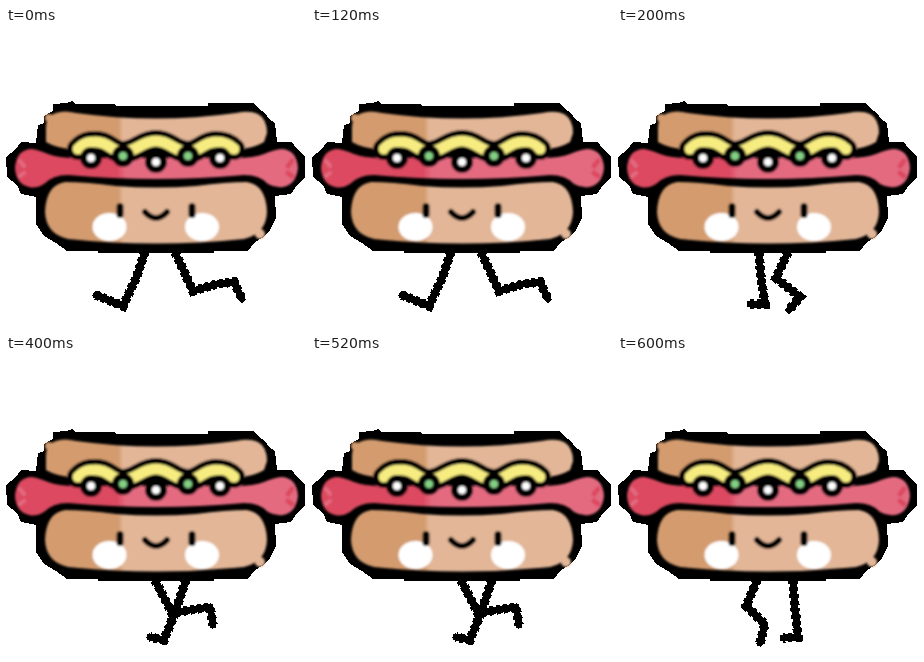
An HTML page for the animation above (0.8 s loop, 300 by 300 pixels).

```html
<!DOCTYPE html>
<html lang="en">
<head>
<meta charset="utf-8">
<title>Running hot dog</title>
<style>
html, body { margin: 0; height: 100%; overflow: hidden; background: #fff; }
svg { display: block; width: 100vw; height: 100vh; }
.line { fill: none; stroke: #000; stroke-linecap: round; stroke-linejoin: round; }
.rough { fill: none; stroke: #000; stroke-dasharray: 4 3; }
</style>
</head>
<body>
<svg viewBox="0 0 300 300">
  <defs>
    <linearGradient id="bun" gradientUnits="userSpaceOnUse" x1="0" x2="300" y1="0" y2="0">
      <stop offset=".375" stop-color="#d39b6e"/>
      <stop offset=".39" stop-color="#e2b697"/>
    </linearGradient>
    <linearGradient id="meat" gradientUnits="userSpaceOnUse" x1="0" x2="300" y1="0" y2="0">
      <stop offset=".37" stop-color="#dc4a61"/>
      <stop offset=".4" stop-color="#e46b80"/>
    </linearGradient>
    <filter id="soft"><feGaussianBlur stdDeviation=".9"/></filter>
    <path id="mustard" d="M72 121C79 114 84 114 90 114C103 114 106 124 117 124C130 124 136 113 150 113C164 113 169 124 182 124C193 124 197 114 210 114C216 114 222 115 228 121"/>
  </defs>
  <g shape-rendering="crispEdges">
    <path class="leg line" stroke-width="7"/>
    <path class="leg rough" stroke-width="9.5"/>
    <!-- silhouette -->
    <path d="M66 73L69 76H108L110 78H202V75H248L252 80L260 86L263 91L269 95L271 114H286L290 120L299 128V149L291 157L285 166L269 168L270 190L264 202L258 209L249 214L242 223H208V225H92V223H61L50 215L38 208L30 196V169L15 166L11 157L1 149L0 129L10 121L15 114L30 115L32 97L38 95V88L47 83V76L60 75Z"/>
  </g>

  <g filter="url(#soft)">
    <!-- top bun -->
    <path fill="url(#bun)" d="M40 114V103Q39 88 50 85Q58 82 70 85Q150 96 230 85Q244 82 252 86Q261 91 261 105L258 114Q248 120 234 121H66Q50 120 40 114Z"/>
    <circle cx="43" cy="90" r="4" fill="#d39b6e"/>

    <!-- sausage -->
    <path fill="url(#meat)" d="M9 140Q10 123 24 121Q30 121 42 126Q52 130 70 130H230Q248 130 258 126Q270 121 277 121Q291 123 292 140Q290 157 277 159Q269 160 262 156Q254 147 238 147Q150 155 62 147Q47 147 38 156Q30 161 23 159Q10 156 9 140Z"/>
    <path fill="none" stroke="#e46b80" stroke-width="4" stroke-linecap="round" d="M14 133L18 138M18 145L14 148"/>
    <path fill="none" stroke="#dc4a61" stroke-width="5" stroke-linecap="round" d="M286 133L282 138M282 145L286 148"/>

    <!-- bottom bun -->
    <path fill="url(#bun)" d="M39 184Q40 157 59 154Q80 154 110 158Q150 161 190 158Q220 154 241 154Q260 157 261 184Q260 206 238 211Q150 220 62 211Q40 206 39 184Z"/>
    <circle cx="254" cy="206" r="5" fill="#e2b697"/>

    <!-- mustard -->
    <use href="#mustard" class="line" stroke-width="22"/>
    <use href="#mustard" class="line" stroke-width="11" style="stroke:#f6ec80"/>
    <g id="dots"></g>

    <!-- face -->
    <g fill="#fff">
      <ellipse cx="103.5" cy="199" rx="17" ry="14"/>
      <ellipse cx="196" cy="199" rx="17" ry="14"/>
    </g>
    <rect x="110.5" y="175" width="7" height="15" rx="3.5"/>
    <rect x="182.5" y="175" width="7" height="15" rx="3.5"/>
    <path class="line" stroke-width="6" d="M139 184Q150 196 161 184"/>
  </g>
</svg>
<script>
const dots = [[85, 130], [117, 128], [150, 134], [182, 128], [214, 130]];
document.getElementById('dots').innerHTML = dots.map(([x, y], i) =>
  `<circle cx="${x}" cy="${y}" r="11"/>
   <circle cx="${x}" cy="${y}" r="4" fill="${i % 2 ? '#83cf83' : '#fff'}"/>`).join('');

const poses = [
  'M139 224L131 248L117 278L90 267M169 224L187 263L211 256L228 254L236 271',
  'M141 224L143 250L147 276L132 276M170 224L158 250L182 269L171 282',
  'M149 224L166 257L184 254L204 251L207 269M180 224L170 254L158 284L144 281',
  'M139 224L128 250L147 268L142 287M175 224L177 252L180 281L165 282'
];
const legs = document.querySelectorAll('.leg');

function draw(now) {
  const pose = poses[Math.floor(now / 200) % poses.length];
  legs.forEach(leg => leg.setAttribute('d', pose));
  requestAnimationFrame(draw);
}
draw(0);
</script>
</body>
</html>
```
